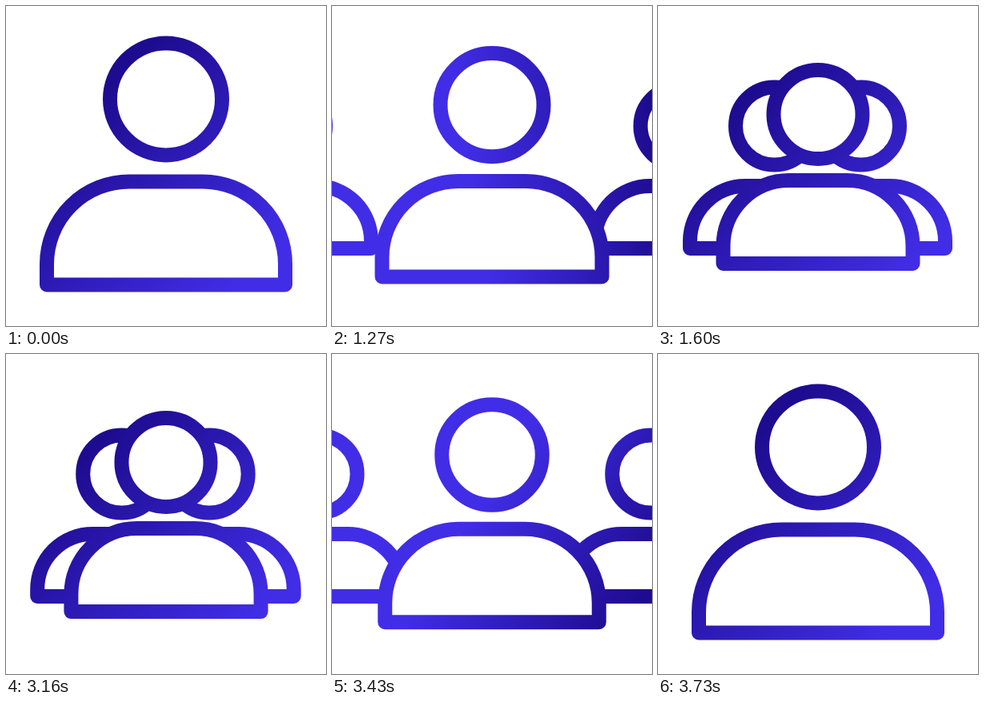
Write an HTML page with a canvas that moves like this. It is 400 px wide and 400 px high and loops after 3760 ms.

```html
<!DOCTYPE html>
<html lang="en">
<head>
<meta charset="utf-8">
<title>One user becomes a group</title>
<style>
  html, body { margin: 0; width: 100%; height: 100%; overflow: hidden; background: #fff; }
  canvas { display: block; width: 400px; height: 400px; }
</style>
</head>
<body>
<canvas id="stage"></canvas>
<script>
const LOOP = 3760, STEP = 30, STEPS = 20;
const GATHER = 1000, PART = 3130;
const DARK = '#1e0c90', BRIGHT = '#412de6';

const canvas = document.getElementById('stage');
const ctx = canvas.getContext('2d');
const ratio = window.devicePixelRatio || 1;
canvas.width = canvas.height = 400 * ratio;
ctx.scale(ratio, ratio);

const mix = (a, b, p) => a + (b - a) * p;

// Equivalent of cubic-bezier(.6, 0, .4, 1)
function ease(x) {
  if (x <= 0 || x >= 1) return x <= 0 ? 0 : 1;
  let lo = 0, hi = 1;
  for (let i = 0; i < 30; i++) {
    const s = (lo + hi) / 2, r = 1 - s;
    if (1.8 * s * r * r + 1.2 * s * s * r + s * s * s < x) lo = s;
    else hi = s;
  }
  return lo * lo * (3 - 2 * lo);
}

const progress = (ms, start) => ease(Math.floor((ms - start) / STEP) / STEPS);

// The gradient turns once around the stage and drifts outwards midway.
function paint(p) {
  const swell = Math.sin(Math.PI * p);
  const angle = (45 + 360 * p - 12 * swell) * Math.PI / 180;
  const middle = 25 - 120 * swell;
  const half = (290 - 60 * swell) / 2;
  const dx = Math.cos(angle), dy = Math.sin(angle);
  const at = d => [200 + dx * d, 200 + dy * d];
  const fill = ctx.createLinearGradient(...at(middle - half), ...at(middle + half));
  fill.addColorStop(0, DARK);
  fill.addColorStop(1, BRIGHT);
  return fill;
}

function person(x, { headY, headR, half, top, bottom, corner }) {
  ctx.beginPath();
  ctx.moveTo(x - half, bottom);
  ctx.arcTo(x - half, top, x, top, corner);
  ctx.arcTo(x + half, top, x + half, bottom, corner);
  ctx.lineTo(x + half, bottom);
  ctx.closePath();
  ctx.fill();
  ctx.stroke();

  ctx.beginPath();
  ctx.arc(x, headY, headR, 0, 2 * Math.PI);
  ctx.fill();
  ctx.stroke();
}

const SIDE = { headY: 150, headR: 48.5, half: 105.5, top: 225, bottom: 303, corner: 69 };

function draw(ms) {
  const p = ms < PART ? progress(ms, GATHER) : 1 - progress(ms, PART);
  ctx.fillStyle = '#fff';
  ctx.fillRect(0, 0, 400, 400);
  ctx.strokeStyle = paint(p);
  ctx.lineWidth = 18;
  ctx.lineJoin = 'round';

  person(mix(-179.5, 145.5, p), SIDE);
  person(mix(544, 253.5, p), SIDE);
  person(200, {
    headY: mix(116.4, 135.5, p),
    headR: mix(70, 55.5, p),
    half: mix(149, 118.5, p),
    top: mix(219.5, 218, p),
    bottom: mix(348.5, 322, p),
    corner: mix(103, 82, p)
  });
}

const start = performance.now();
function tick() {
  draw((performance.now() - start) % LOOP);
  requestAnimationFrame(tick);
}
tick();
</script>
</body>
</html>
```
